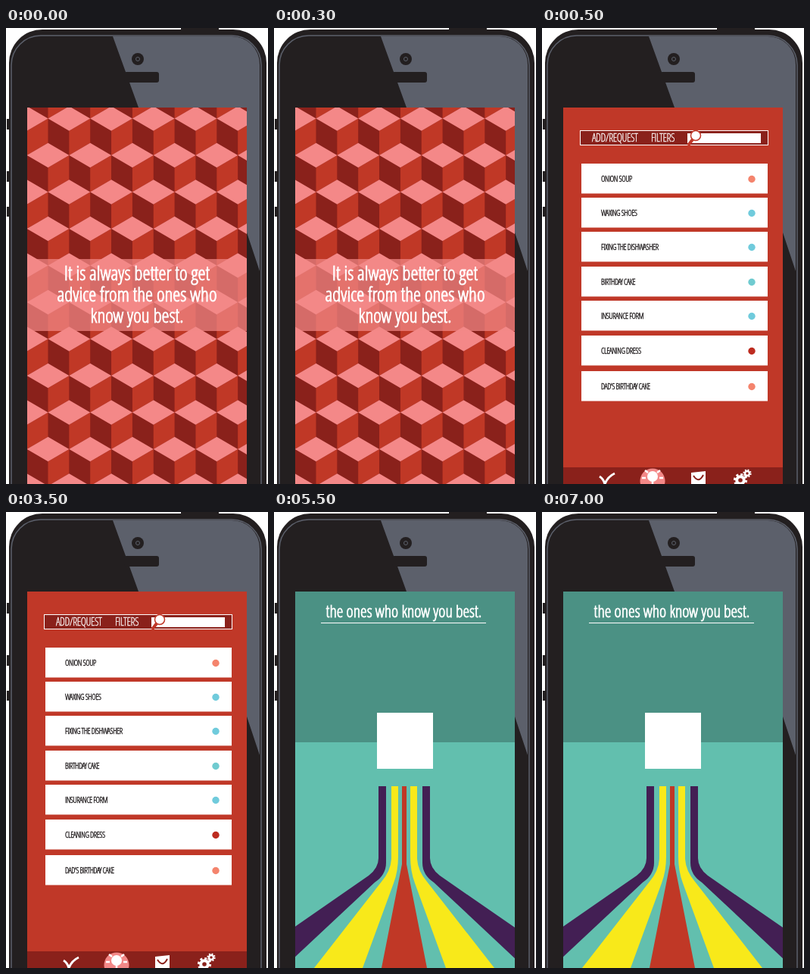
An HTML page for the animation above (8000 ms loop, 346 by 602 pixels).

```html
<!DOCTYPE html>
<html lang="en">
<head>
<meta charset="utf-8">
<title>Phone app screens</title>
<style>
  html, body { margin: 0; width: 100%; height: 100%; overflow: hidden; background: #fff; }
  svg { display: block; width: 346px; height: 602px; }
  text {
    font-family: "Open Sans", "Noto Sans", sans-serif;
    font-weight: 300; font-stretch: 75%;
    fill: #fff; stroke: #fff;
  }
  .quote { font-size: 25.5px; text-anchor: middle; stroke-width: .9px; }
  .tagline { font-size: 22px; text-anchor: middle; stroke-width: .8px; }
  .menu { font-size: 14px; letter-spacing: -.45px; stroke-width: .3px; }
  .item { font-size: 10.5px; letter-spacing: -.45px; fill: #231f20; stroke: #231f20; stroke-width: .35px; }
</style>
</head>
<body>
<svg viewBox="0 0 346 602">
  <defs>
    <clipPath id="screen"><rect x="28" y="105" width="290" height="497"/></clipPath>
    <g id="ribbons">
      <path fill="#431f54" d="M138 362V457Q138 470 125 480L24 550V591L133 489Q148 479 148 463V362Z"/>
      <path fill="#f8e91a" d="M155 362V458Q154 474 142 488L53 602H117L158 490Q164 474 164 455V362Z"/>
    </g>
    <g id="gear" fill="none" stroke="#fff">
      <circle r="4.8" stroke-width="4"/>
      <circle r="7.6" stroke-width="3" stroke-dasharray="3 2.97"/>
    </g>
  </defs>

  <g id="phone">
    <path fill="#231f20" d="M231 0H281V4H231ZM1 120H6V134H1ZM1 189H6V203H1ZM1 236H6V249H1Z"/>
    <path fill="#231f20" d="M4 602V46A44 44 0 0 1 48 2H300A44 44 0 0 1 344 46V602Z"/>
    <path fill="#5c606b" d="M141 11H298A37 37 0 0 1 335 48V321L318 270V105H175Z"/>
    <path fill="none" stroke="#5c606b" stroke-width="1.5" d="M7 602V49A39 39 0 0 1 46 10H298A39 39 0 0 1 337 49V602"/>
    <circle cx="174" cy="41" r="8" fill="#231f20"/>
    <circle cx="174" cy="41" r="2.5" fill="none" stroke="#5c606b"/>
    <rect x="156" y="58" width="46" height="14" rx="3" fill="#231f20"/>
  </g>

  <g clip-path="url(#screen)">
    <g class="scene">
      <rect x="28" y="105" width="290" height="497" fill="#8a211b"/>
      <g id="cubes"></g>
      <rect x="28" y="305" width="290" height="95" fill="#f38887" fill-opacity=".72"/>
      <text class="quote" x="173" y="333">It is always better to get</text>
      <text class="quote" x="173" y="361">advice from the ones who</text>
      <text class="quote" x="173" y="389">know you best.</text>
    </g>

    <g class="scene">
      <rect x="28" y="105" width="290" height="497" fill="#c03828"/>
      <rect x="50.5" y="135.5" width="248" height="19" fill="#8a211b" stroke="#fff"/>
      <text class="menu" x="66" y="150">ADD/REQUEST</text>
      <text class="menu" x="144" y="150">FILTERS</text>
      <rect x="192" y="139" width="97" height="13" fill="#fff"/>
      <path stroke="#c03828" stroke-width="4" d="M199 147L193 155"/>
      <circle cx="203" cy="142" r="6.5" fill="#fff" stroke="#c03828" stroke-width="1.5"/>
      <g id="list"></g>
      <rect x="28" y="580" width="290" height="22" fill="#8a211b"/>
      <path fill="none" stroke="#fff" stroke-width="3" d="M76 592Q81 595 83 602Q87 592 96 588"/>
      <circle cx="146" cy="598" r="16.5" fill="#f38887"/>
      <circle cx="146" cy="592" r="7" fill="#fff"/>
      <path stroke="#fff" stroke-width="2.5" d="M146 597V602M132 594H137M155 594H160M136 584L140 587M156 584L152 587"/>
      <path fill="#fff" d="M197 587L216 585V602H197Z"/>
      <path fill="none" stroke="#8a211b" stroke-width="2" d="M200 591Q207 602 213 590"/>
      <use href="#gear" transform="translate(262 597)"/>
      <use href="#gear" transform="translate(271 588) scale(.62)"/>
    </g>

    <g class="scene">
      <rect x="28" y="105" width="290" height="199" fill="#4b9184"/>
      <rect x="28" y="304" width="290" height="298" fill="#62bfae"/>
      <text class="tagline" x="171.5" y="139">the ones who know you best.</text>
      <path stroke="#fff" d="M62 146.5H280"/>
      <rect x="136" y="265" width="74" height="74" fill="#fff"/>
      <use href="#ribbons"/>
      <use href="#ribbons" transform="translate(344 0) scale(-1 1)"/>
      <path fill="#c03826" d="M169 362V465L142 602H202L175 465V362Z"/>
    </g>
  </g>
</svg>
<script>
  const LOOP = 8000;
  const STARTS = [0, 500, 5500];

  function add(parent, tag, attributes, text = '') {
    const node = document.createElementNS('http://www.w3.org/2000/svg', tag);
    for (const [key, value] of Object.entries(attributes)) node.setAttribute(key, value);
    node.textContent = text;
    parent.append(node);
  }

  // Isometric cubes in staggered rows; the dark right faces are the background.
  const cubes = document.getElementById('cubes');
  const halfWidth = 27.85, halfHeight = 16.2, pitch = 48.5;
  let tops = '', sides = '';
  for (let row = 0; row < 12; row++) {
    const y = 71 + row * pitch;
    for (let column = -1; column < 6; column++) {
      const x = 55.5 + (column * 2 + row % 2) * halfWidth;
      tops += `M${x - halfWidth} ${y}l${halfWidth} ${-halfHeight} ${halfWidth} ${halfHeight} ${-halfWidth} ${halfHeight}z`;
      sides += `M${x} ${y + halfHeight}l${-halfWidth} ${-halfHeight}v${pitch - halfHeight}l${halfWidth} ${halfHeight}z`;
    }
  }
  // The row offset puts the dark face left of each cube's front edge.
  add(cubes, 'path', { d: sides, fill: '#8a211b' });
  add(cubes, 'path', {
    d: sides.replace(/M(\S+) (\S+)l(\S+)/g, 'M$1 $2l$3').replace(/l-27\.85 /g, 'l27.85 ').replace(/(v\S+?)l27\.85 /g, '$1l-27.85 '),
    fill: '#c03826'
  });
  add(cubes, 'path', { d: tops, fill: '#f48888' });

  const CORAL = '#f4846d', BLUE = '#70cbdc', TEAL = '#70cbd0', RED = '#bd2c20';
  const items = [
    ['ONION SOUP', 179, CORAL],
    ['WAXING SHOES', 224, BLUE],
    ['FIXING THE DISHWASHER', 269, BLUE],
    ['BIRTHDAY CAKE', 315, TEAL],
    ['INSURANCE FORM', 360, BLUE],
    ['CLEANING DRESS', 406, RED],
    ["DAD'S BIRTHDAY CAKE", 453, CORAL]
  ];
  const list = document.getElementById('list');
  for (const [label, y, color] of items) {
    add(list, 'rect', { x: 52, y, width: 246, height: 39.5, fill: '#fff' });
    add(list, 'text', { class: 'item', x: 78, y: y + 24 }, label);
    add(list, 'circle', { cx: 277, cy: y + 20.5, r: 4.7, fill: color });
  }

  const scenes = document.querySelectorAll('.scene');
  const began = performance.now();
  function draw() {
    const time = (performance.now() - began) % LOOP;
    const current = STARTS.findLastIndex(start => time >= start);
    scenes.forEach((scene, index) => scene.style.display = index === current ? '' : 'none');
    requestAnimationFrame(draw);
  }
  draw();
</script>
</body>
</html>
```
